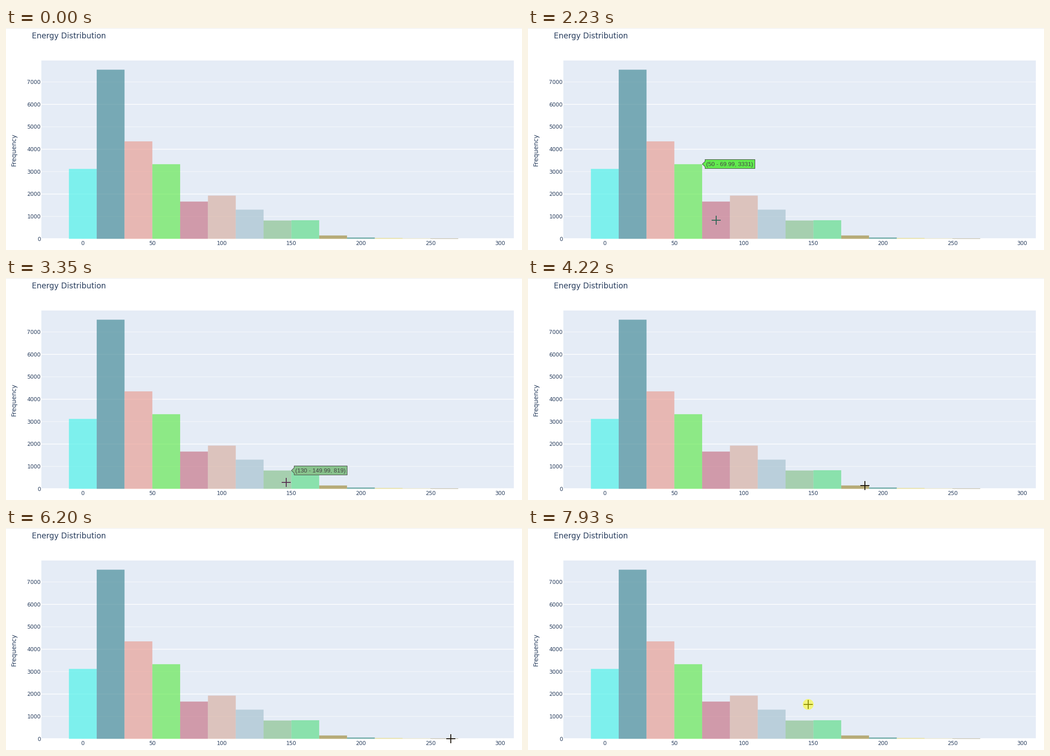
Write a matplotlib script that moves like this. It is 1138 px wide and 492 px high and loops after 8 s.

```python
from math import floor, pi, sin

import matplotlib.pyplot as plt
import numpy as np
from matplotlib.animation import FuncAnimation
from matplotlib.colors import to_rgb
from matplotlib.patches import Circle, Polygon, Rectangle

W, H, DPI = 1138, 492, 100
LOOP, STEP = 8000, 20
ENTER, CLICK, HOVER_DELAY = 120, 7890, 120
BASE_Y, UNIT = 467.3, 0.04967
PAPER, INK, EDGE = "#e5ecf6", "#2a3f5f", "#444444"
ALPHA = 0.67

COUNTS = [3122, 7548, 4350, 3331, 1664, 1930, 1304, 819, 830, 151, 62, 37, 25, 20]
TINTS = ["#7ef0ee", "#78a9b5", "#e8b7b3", "#8dea86", "#d19aaa", "#ddc3bd", "#bbd0dc",
         "#a7d0af", "#8ae2ac", "#b6ac78", "#78afad", "#e2dc9c", "#e2e0c6", "#a8a48c"]

# cursor moves: start and end in ms, where it stops, height of the arc
ENTRY = (967, 494)
MOVES = [
    (110, 800, (184, 420), -15),
    (1150, 1900, (341, 417), -35),
    (2010, 2230, (419, 426), 0),
    (2500, 3290, (606, 453), 0),
    (3290, 3800, (726, 457), 0),
    (4110, 4900, (845, 467), 3),
    (4945, 5740, (956, 467), 0),
    (5780, 6200, (981, 467), 0),
    (6300, 6560, (961, 449), 0),
    (6600, 7050, (438, 293), -15),
    (7050, 7380, (532, 367), 0),
    (7430, 7690, (618, 391), 0),
]


def px(value):
    return 169.4 + value * 3.0667


def py(count):
    return BASE_Y - count * UNIT


def solid(tint):
    """Opaque colour that gives the tint when laid over the paper at ALPHA."""
    paper = np.array(to_rgb(PAPER))
    return np.clip(paper - (paper - np.array(to_rgb(tint))) / ALPHA, 0, 1)


fig = plt.figure(figsize=(W / DPI, H / DPI), dpi=DPI, facecolor="white")
ax = fig.add_axes([0, 0, 1, 1])
ax.set(xlim=(0, W), ylim=(H, 0))
ax.axis("off")


def box(x0, y0, x1, y1, color, **kw):
    return ax.add_patch(Rectangle((x0, y0), x1 - x0, y1 - y0, fc=color, lw=0, **kw))


def label(x, y, text, size, color=INK, font="DejaVu Sans", **kw):
    return ax.text(x, y, text, fontsize=size * 72 / DPI, color=color, family=font, **kw)


class Bar:
    def __init__(self, index, count, tint):
        low = 20 * index - 10
        self.left, self.right, self.top = px(low), px(low + 20), py(count)
        self.tint, self.color = to_rgb(tint), solid(tint)
        self.text = f"({low} - {low + 19.99:.2f}, {count})".replace("(-", "(\u2212")
        box(self.left, self.top, self.right, BASE_Y, self.color,
            alpha=ALPHA, snap=False, zorder=2)

    def holds(self, x, y):
        return self.left <= x < self.right and self.top <= y < BASE_Y - 0.8


box(0, 0, W, 1, "#e9e9e9")
box(78, 72, 1120, 467, PAPER)
box(78, 466, 1120, 468, "white", zorder=1)
for k in range(8):
    y = py(1000 * k)
    label(76.5, y + 4.5, str(1000 * k), 12, ha="right")
    if k:
        width, alpha = (1, 0.75) if k % 2 else (1.5, 1)
        box(78, y - width / 2, 1120, y + width / 2, "white",
            alpha=alpha, snap=False, zorder=1)
for value in range(0, 301, 50):
    label(px(value), 481, str(value), 12, ha="center")
label(57.5, 23, "Energy Distribution", 17)
label(17.5, 269.5, "Frequency", 14, rotation=90, ha="center", va="center")
bars = [Bar(i, *pair) for i, pair in enumerate(zip(COUNTS, TINTS))]

tip_text = label(0, 0, "", 13, EDGE, "Liberation Sans", zorder=5)
tip_box = ax.add_patch(Polygon([(0, 0)] * 3, ec=EDGE, lw=0.72, zorder=4))
cross = [box(0, 0, 20, 2, "black", zorder=6), box(0, 0, 2, 20, "black", zorder=6)]
halo = ax.add_patch(Circle(MOVES[-1][2], 12, fc="#ffff00", alpha=0.5, lw=0, zorder=7))


def cursor(t):
    x, y = ENTRY
    for start, end, (to_x, to_y), arc in MOVES:
        if t <= start:
            break
        u = min(1, (t - start) / (end - start))
        x += (to_x - x) * u
        y += (to_y - y) * u + arc * sin(pi * u)
    return x, y


def bar_at(x, y):
    return next((bar for bar in bars if bar.holds(x, y)), None)


def show_tip(bar):
    tip_text.set_text(bar.text)
    x, y = round(bar.right) + 0.5, floor(bar.top) + 0.5
    x0 = x + 6
    x1 = x0 + 6 + round(tip_text.get_window_extent().width)
    tip_box.set_xy([(x, y), (x0, y - 6), (x0, y - 10), (x1, y - 10),
                    (x1, y + 10), (x0, y + 10), (x0, y + 6)])
    tip_box.set_facecolor(bar.color)
    tip_text.set_position((x0 + 3, y + 4.5))


def update(n):
    t = n * STEP
    hovered = bar_at(*cursor(t - HOVER_DELAY))
    for part in (tip_box, tip_text):
        part.set_visible(hovered is not None)
    if hovered:
        show_tip(hovered)

    # the cross shows the inverse of what lies under it
    x, y = cursor(t)
    under = bar_at(x, y)
    color = 1 - np.array(under.tint if under else to_rgb(PAPER))
    cx, cy = round(x), round(y)
    cross[0].set_xy((cx - 10, cy - 1))
    cross[1].set_xy((cx - 1, cy - 10))
    for part in cross:
        part.set_facecolor(color)
        part.set_visible(t >= ENTER)
    halo.set_visible(t >= CLICK)
    return tip_box, tip_text, *cross, halo


anim = FuncAnimation(fig, update, frames=LOOP // STEP, interval=STEP,
                     init_func=lambda: update(0), blit=True, repeat=True, repeat_delay=0)
plt.show()
```
